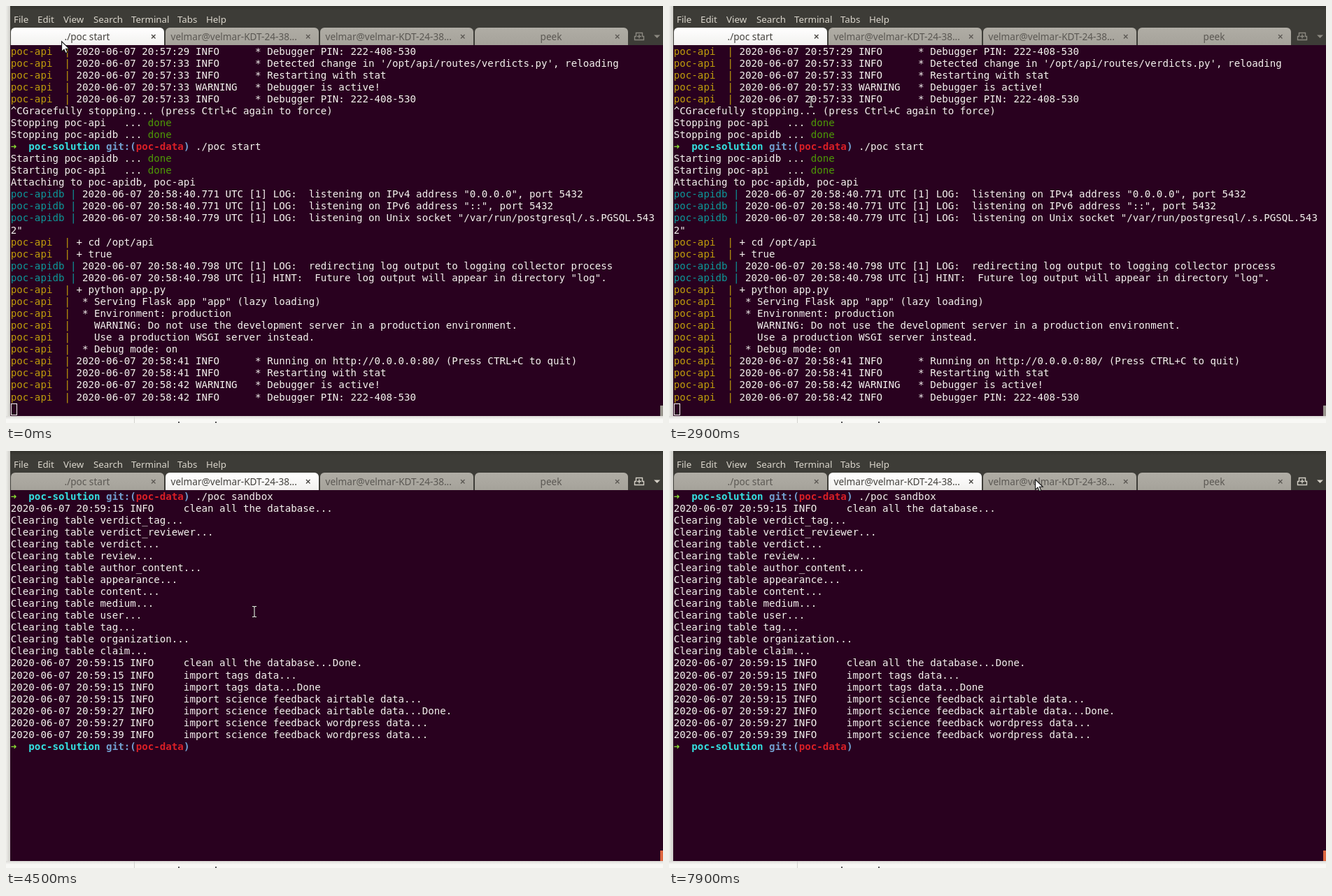
Write an HTML page that moves like this. It is 939 px wide and 597 px high and loops after 8 s.

```html
<!DOCTYPE html>
<html lang="en">
<head>
<meta charset="utf-8">
<title>Terminal session</title>
<style>
  html, body { margin: 0; width: 100%; height: 100%; overflow: hidden; }
  body { position: relative; background: #f3f3ef; }
  #stage { position: absolute; left: 0; top: 0; width: 939px; height: 597px; overflow: hidden; }
  #stage * { position: absolute; white-space: pre; }
  .edge { left: 0; top: 0; width: 6px; height: 597px; background: linear-gradient(90deg, #eeeeea, #cfcec9); }
  .under { left: 0; top: 587px; width: 939px; height: 10px; background: linear-gradient(#dcdbd7, #f8f8f5 50%); }
  .rule { left: 183px; top: 587px; width: 1px; height: 10px; background: #d2d2ce; }
  .speck { top: 595px; width: 2px; height: 2px; background: #555; }
  .window { left: 6px; top: 0; width: 933px; height: 587px; background: linear-gradient(#34332e, #3d3c37 6px); }
  .menu, .label { font-family: Ubuntu, "Noto Sans", "Open Sans", sans-serif; }
  .menu { top: 9px; line-height: 20px; font-size: 13.3px; color: #dad6cc; }
  .tab { top: 31px; width: 219px; height: 25px; border-radius: 6px 6px 0 0;
         background: linear-gradient(#b0ada5, #a5a29a); color: #5b5853; }
  .tab.on { background: linear-gradient(#ffffff, #f2f1ef); color: #45433f; }
  .label { left: 8px; width: 203px; top: 3px; line-height: 20px; font-size: 13.6px; text-align: center; }
  .label.long { width: auto; }
  .close { left: 200px; top: 9px; }
  .screen { left: 6px; top: 56px; width: 933px; height: 531px; background: #29011f; }
  .row { left: .8px; height: 17.07px; line-height: 17.07px; color: #f4f2ee;
         font-family: "DejaVu Sans Mono", "Noto Sans Mono", monospace; font-size: 14.15px; letter-spacing: .006px; }
  #stage .row span { position: static; }
  #stage .row .arrow { display: inline-block; width: 1ch; color: #8ae234; }
  .y { color: #bf9c0c; } .c { color: #0d979a; } .g { color: #4e9a06; }
  .p, .b, .r { font-weight: bold; }
  .p { color: #34e2e2; } .b { color: #729fcf; } .r { color: #d91f26; }
  .block { width: 9px; height: 17px; box-sizing: border-box; border: 1px solid #f6f4f0; background: #f6f4f0; }
  .hollow { background: none; }
  .thumb { left: 935px; top: 572px; width: 4px; height: 15px; }
  svg { overflow: visible; }
</style>
</head>
<body>
<div id="stage">
  <div class="edge"></div>
  <div class="under"></div>
  <div class="rule"></div>
  <div class="speck" style="left:246px"></div>
  <div class="speck" style="left:299px"></div>
  <div class="window"></div>
  <svg id="tools" width="939" height="60" fill="none">
    <path d="M898.5 48.500H911.500V43.500H909.500V38.500H900.500V43.500H898.500ZM905 40.500V46.500M902 43.500H908" stroke="currentColor" stroke-width="1.4"/>
    <path d="M926 41.500H935L930.500 46Z" fill="currentColor"/>
  </svg>
  <div class="screen" id="log"></div>
  <div class="screen" id="shell"></div>
  <div class="thumb" id="thumb"></div>
  <svg id="arrow" width="14" height="20">
    <path d="M.6 .8V15.200L4 12.200L6.300 17.500L8.800 16.400L6.500 11.300H11.300Z" fill="#fff" stroke="#111" stroke-width="1.1"/>
  </svg>
  <svg id="beam" width="8" height="18" fill="none">
    <path d="M-3 -7.500H-1L0 -6.500L1 -7.500H3M0 -6.500V6.500M-3 7.500H-1L0 6.500L1 7.500H3" stroke="#111" stroke-width="2.2" opacity=".5"/>
    <path d="M-3 -7.500H-1L0 -6.500L1 -7.500H3M0 -6.500V6.500M-3 7.500H-1L0 6.500L1 7.500H3" stroke="#e6ebe2" stroke-width="1.1"/>
  </svg>
</div>
<script>
const LOOP = 8000, STEP = 100, ROW = 17.07, COL = 8.525;
const FOCUS_AT = 3600, SWITCH_AT = 3700;
const $ = id => document.getElementById(id);
const stage = $('stage');

function add(parent, cls, html, style = {}) {
  const el = document.createElement('div');
  el.className = cls;
  el.innerHTML = html;
  Object.assign(el.style, style);
  parent.append(el);
  return el;
}

const menus = { File: 11, Edit: 45, View: 82, Search: 125, Terminal: 179, Tabs: 245, Help: 286 };
for (const [name, x] of Object.entries(menus)) add(stage, 'menu', name, { left: x + 'px' });

const host = 'velmar@velmar-KDT-24-38...';
const cross = '<svg class="close" width="8" height="8"><path d="M1 1L6.500 6.500M6.500 1L1 6.500" stroke="currentColor" stroke-width="1.3"/></svg>';
const tabs = ['./poc start', host, host, 'peek'].map((text, i) =>
  add(stage, 'tab', `<div class="label${text === host ? ' long' : ''}">${text}</div>${cross}`,
    { left: 6.500 + 221 * i + 'px' }));

const prompt = '$ ';
const day = '2020-06-07 ';
const api = text => 'poc-api  | ' + text;
const db = (ms, text) => `poc-apidb | ${day}20:58:40.${ms} UTC [1] ${text}`;
const note = (time, level, text) => api(`${day}20:${time} ${level.padEnd(9)} * ${text}`);
const pin = 'Debugger PIN: 222-408-530';

const logLines = [
  note('57:29', 'INFO', pin),
  note('57:33', 'INFO', "Detected change in '/opt/api/routes/verdicts.py', reloading"),
  note('57:33', 'INFO', 'Restarting with stat'),
  note('57:33', 'WARNING', 'Debugger is active!'),
  note('57:33', 'INFO', pin),
  '^CGracefully stopping... (press Ctrl+C again to force)',
  'Stopping poc-api   ... done',
  'Stopping poc-apidb ... done',
  prompt + './poc start',
  'Starting poc-apidb ... done',
  'Starting poc-api   ... done',
  'Attaching to poc-apidb, poc-api',
  db(771, 'LOG:  listening on IPv4 address "0.0.0.0", port 5432'),
  db(771, 'LOG:  listening on IPv6 address "::", port 5432'),
  db(779, 'LOG:  listening on Unix socket "/var/run/postgresql/.s.PGSQL.543'),
  '2"',
  api('+ cd /opt/api'),
  api('+ true'),
  db(798, 'LOG:  redirecting log output to logging collector process'),
  db(798, 'HINT:  Future log output will appear in directory "log".'),
  api('+ python app.py'),
  api(' * Serving Flask app "app" (lazy loading)'),
  api(' * Environment: production'),
  api('   WARNING: Do not use the development server in a production environment.'),
  api('   Use a production WSGI server instead.'),
  api(' * Debug mode: on'),
  note('58:41', 'INFO', 'Running on http://0.0.0.0:80/ (Press CTRL+C to quit)'),
  note('58:41', 'INFO', 'Restarting with stat'),
  note('58:42', 'WARNING', 'Debugger is active!'),
  note('58:42', 'INFO', pin)
];

const info = (sec, text) => `${day}20:59:${sec} INFO     ${text}`;
const tables = ['verdict_tag', 'verdict_reviewer', 'verdict', 'review', 'author_content', 'appearance',
  'content', 'medium', 'user', 'tag', 'organization', 'claim'];
const shellLines = [
  prompt + './poc sandbox',
  info(15, 'clean all the database...'),
  ...tables.map(name => `Clearing table ${name}...`),
  info(15, 'clean all the database...Done.'),
  info(15, 'import tags data...'),
  info(15, 'import tags data...Done'),
  info(15, 'import science feedback airtable data...'),
  info(27, 'import science feedback airtable data...Done.'),
  info(27, 'import science feedback wordpress data...'),
  info(39, 'import science feedback wordpress data...'),
  prompt
];

const paint = line => line
  .replace(/^poc-api  \|/, '<span class="y">$&</span>')
  .replace(/^poc-apidb \|/, '<span class="c">$&</span>')
  .replace(/done$/, '<span class="g">done</span>')
  .replace(/^\$ /, '<span class="arrow">➜</span>  <span class="p">poc-solution</span> ' +
    '<span class="b">git:(</span><span class="r">poc-data</span><span class="b">)</span> ');

function fill(screen, lines, row, col) {
  lines.forEach((line, i) => add(screen, 'row', paint(line), { top: .5 + i * ROW + 'px' }));
  return add(screen, 'block', '', { left: Math.round(.5 + col * COL) + 'px', top: Math.round(.7 + row * ROW) + 'px' });
}
const logBlock = fill($('log'), logLines, 30, 0);
const shellBlock = fill($('shell'), shellLines, 21, 31);

// Pointer path: time, x, y
const path = [
  [0, 79, 50], [200, 200, 100], [400, 334, 220], [500, 270, 310], [600, 160, 330], [900, 13, 200],
  [1100, 120, 81], [1400, 338, 190], [1800, 325, 351], [1900, 232, 243], [2000, 150, 199],
  [2200, 37, 235], [2300, 37, 235], [2400, 48, 254], [2800, 170, 170], [3200, 301, 39],
  [3300, 301, 35], [3800, 301, 35], [4000, 260, 130], [4300, 320, 270], [4500, 355, 230],
  [4600, 355, 230], [4800, 290, 71], [5200, 200, 189], [5300, 200, 189], [5400, 192, 232],
  [5600, 447, 380], [5700, 289, 400], [5800, 289, 400], [5900, 270, 448], [6100, 250, 384],
  [6200, 233, 400], [6300, 233, 400], [6500, 361, 400], [6600, 361, 400], [6700, 339, 396],
  [7000, 526, 21], [7200, 526, 21], [7400, 523, 40], [LOOP, 523, 40]
];
const blinks = [4200, 4800, 5400, 6000, 6700, 7300, 7900];

function pointerAt(t) {
  const i = path.findIndex(key => key[0] > t);
  const [t0, x0, y0] = path[i - 1], [t1, x1, y1] = path[i];
  const k = (t - t0) / (t1 - t0);
  return [x0 + (x1 - x0) * k, y0 + (y1 - y0) * k].map(Math.round);
}

const show = (el, on) => { el.style.visibility = on ? 'visible' : 'hidden'; };

function draw(now) {
  const t = Math.floor(now % LOOP / STEP) * STEP;
  const second = t >= SWITCH_AT, focused = t >= FOCUS_AT;
  $('log').style.display = second ? 'none' : 'block';
  $('shell').style.display = second ? 'block' : 'none';
  tabs.forEach((tab, i) => tab.classList.toggle('on', i === +second));
  logBlock.classList.toggle('hollow', !focused);
  shellBlock.style.opacity = blinks.filter(b => b <= t).length % 2 ? 0 : 1;
  $('thumb').style.background = second ? '#dd6640' : '#99958e';
  $('tools').style.color = focused ? '#d3cfc5' : '#8b8880';

  const [x, y] = pointerAt(t);
  const overText = y > 56;
  const pointer = overText ? $('beam') : $('arrow');
  show($('beam'), overText);
  show($('arrow'), !overText);
  pointer.style.transform = `translate(${x}px, ${y}px)`;
}

for (const id of ['arrow', 'beam']) {
  Object.assign($(id).style, { left: 0, top: 0 });
  stage.append($(id));
}
function tick() {
  draw(performance.now());
  requestAnimationFrame(tick);
}
tick();
</script>
</body>
</html>
```
